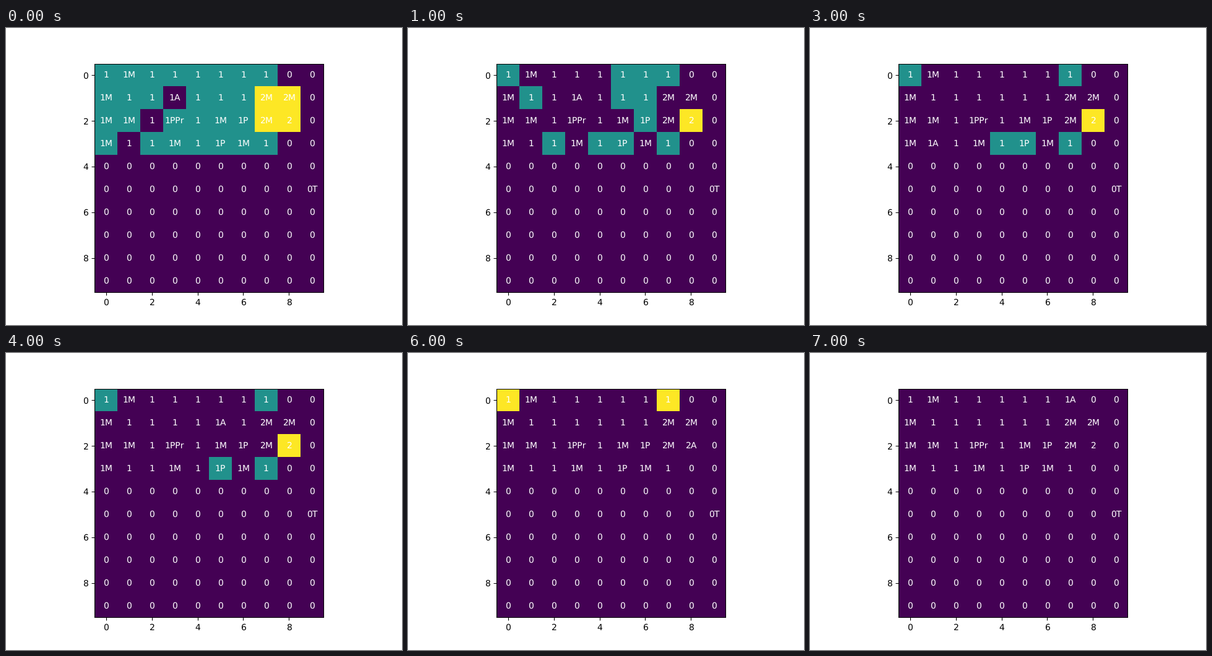
Recreate the animation shown at these times as an HTML page. Size 640 by 480 pixels, loop 8000 ms.

```html
<!DOCTYPE html>
<html lang="en">
<head>
<meta charset="utf-8">
<title>Grid search</title>
<style>
  html, body { margin: 0; width: 100%; height: 100%; overflow: hidden; background: #fff; }
  svg { display: block; width: 640px; height: 480px; }
  text { font: 13.889px "DejaVu Sans", sans-serif; text-rendering: geometricPrecision; }
  #labels { fill: #fff; }
  #cells { shape-rendering: crispEdges; }
  #axes { fill: none; stroke: #000; stroke-width: 1.11; }
</style>
</head>
<body>
<svg viewBox="0 0 640 480">
  <g id="cells"></g>
  <g id="labels"></g>
  <g id="axes"></g>
  <g id="ticks"></g>
</svg>
<script>
const STEP = 1000, STEPS = 8, N = 10;
const LEFT = 143.2, TOP = 57.6, SIZE = 36.96, FONT = 13.889;
const LOW = '#440154', MID = '#21918c', HIGH = '#fde725';

const names = [
  '1 1M 1 1 1 1 1 1 0 0',
  '1M 1 1 1 1 1 1 2M 2M 0',
  '1M 1M 1 1PPr 1 1M 1P 2M 2 0',
  '1M 1 1 1M 1 1P 1M 1 0 0',
  '0 0 0 0 0 0 0 0 0 0',
  '0 0 0 0 0 0 0 0 0 0T'
].map(row => row.split(' '));

// Step at which each cell of the upper rows turns dark.
const darkAt = ['7111122700', '1210122110', '1101112150', '1031461500'];

// Agent position [row, column] at each step.
const agent = [[1, 3], [1, 3], [3, 1], [3, 1], [1, 5], [2, 8], [2, 8], [0, 7]];

const $ = id => document.getElementById(id);

function add(parent, tag, attrs) {
  const el = document.createElementNS('http://www.w3.org/2000/svg', tag);
  for (const key in attrs) el.setAttribute(key, attrs[key]);
  $(parent).appendChild(el);
  return el;
}

// Glyph metrics, measured large and rounded to an eighth of a pixel.
const pen = document.createElement('canvas').getContext('2d');
pen.font = '1000px "DejaVu Sans", sans-serif';
const eighth = v => Math.round(v * FONT / 1000 * 8) / 8;
const advance = ch => eighth(pen.measureText(ch).width);
const bearing = ch => eighth(-pen.measureText(ch).actualBoundingBoxLeft);

// Aligns text at x (0.5 = centred, 1 = right) with its first glyph on whole pixels;
// the glyphs after it sit on the next pixel down.
function setText(el, text, x, align) {
  const chars = [...text], widths = chars.map(advance);
  const b = bearing(chars[0]);
  const ink = Math.round(x - align * widths.reduce((a, w) => a + w, 0) + b);
  let offset = 0;
  const xs = chars.map((ch, i) => {
    const at = ink + offset - (i ? Math.ceil(b) : Math.floor(b));
    offset += widths[i];
    return at;
  });
  el.setAttribute('x', xs.join(' '));
  el.textContent = text;
}

const edgeX = c => Math.round(LEFT + c * SIZE);
const edgeY = r => r ? Math.floor(TOP + r * SIZE) : 58;
const midX = c => LEFT + (c + 0.5) * SIZE;
const midY = r => TOP + (r + 0.5) * SIZE;
const snap = v => Math.floor(v + 0.5) + 0.5;

add('cells', 'rect', { x: 143, y: 58, width: 370, height: 369, fill: LOW });

const cells = [];
for (let r = 0; r < N; r++) {
  for (let c = 0; c < N; c++) {
    const name = names[r]?.[c] ?? '0';
    const x = edgeX(c), y = edgeY(r);
    const off = +(darkAt[r]?.[c] ?? 0);
    const rect = off && add('cells', 'rect', {
      x, y, width: edgeX(c + 1) - x, height: edgeY(r + 1) - y
    });
    const label = add('labels', 'text', { y: Math.round(midY(r) + 4) });
    cells.push({ r, c, name, off, rect, label });
  }
}

let frame = 'M143.5 58.5H513.5V427.5H143.5Z';
for (let i = 0; i < N; i += 2) {
  const x = midX(i), y = midY(i);
  frame += `M${snap(x)} 427.5v5M143.5 ${snap(y)}h-5`;
  setText(add('ticks', 'text', { y: 448 }), String(i), x, 0.5);
  setText(add('ticks', 'text', { y: Math.round(y + 5.501) }), String(i), LEFT - 9.722, 1);
}
add('axes', 'path', { d: frame });

function draw(step) {
  const value = cell => step < cell.off ? +cell.name[0] : 0;
  const max = Math.max(...cells.map(value));
  const [row, col] = agent[step];
  for (const cell of cells) {
    const v = value(cell);
    if (cell.rect) cell.rect.setAttribute('fill', !v ? LOW : v === max ? HIGH : MID);
    const mark = cell.r === row && cell.c === col ? 'A' : '';
    setText(cell.label, cell.name + mark, midX(cell.c), 0.5);
  }
}

let shown = 0;
const start = performance.now();
draw(0);

function tick() {
  const step = Math.floor((performance.now() - start) / STEP) % STEPS;
  if (step !== shown) draw(shown = step);
  requestAnimationFrame(tick);
}
requestAnimationFrame(tick);
</script>
</body>
</html>
```
